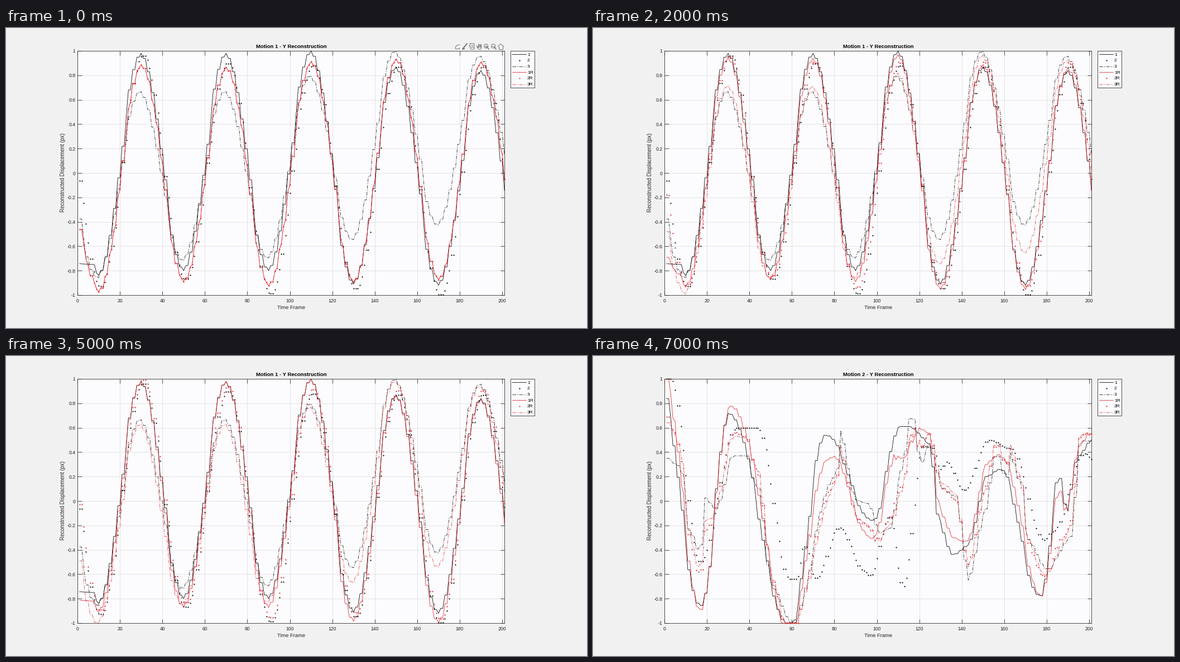
Recreate the animation shown at these times as a matplotlib script. Size 1041 by 538 pixels, loop 8000 ms.

```python
import numpy as np
import matplotlib.pyplot as plt
from matplotlib.animation import FuncAnimation
from matplotlib.patches import Circle, Rectangle

W, H, DPI = 1041, 538, 100
PX = 72 / DPI
INK, RED, PAPER, ICON = "#262626", "#e0222a", "#fcfcfe", "#6a6a6a"
LEFT, RIGHT, TOP, BOTTOM = 128, 893, 41, 479
X = np.arange(1, 202)

plt.rcParams["font.family"] = "Liberation Sans"


def held_times(lengths):
    """Evenly spaced moments, each repeated for a cycling number of samples."""
    counts = np.resize(lengths, len(X))
    moments = np.repeat(np.arange(len(X)), counts)[:len(X)] * np.mean(lengths)
    return moments + X.mean() - moments.mean()


COARSE = held_times((2, 1, 2, 2, 2, 1, 2, 2, 2, 2, 2))
FINE = held_times((2, 1, 1, 1))


def eased(times, keys):
    """Half-cosines through (time, percent) keys."""
    t, y = np.array(keys).T
    k = np.clip(np.searchsorted(t, times, "right") - 1, 0, len(t) - 2)
    u = np.clip((times - t[k]) / (t[k + 1] - t[k]), 0, 1)
    return (y[k] + (y[k + 1] - y[k]) * (1 - np.cos(np.pi * u)) / 2) / 100


def swing(times, shift, *extremes):
    """Troughs and peaks in turn, 20 samples apart."""
    return eased(times, [(20 * i - 10 + shift, y) for i, y in enumerate(extremes)])


# Motion 1: a regular swing; the first sensor rests before it starts
a = swing(COARSE, 0, 40, -84, 98, -80, 98, -80, 100, -91, 87, -92, 84, -85)
a = np.where(X < 9, -.742 - .001 * X, a)
b = swing(FINE, 1, 95, -93, 96, -87, 90, -99, 88, -95, 87, -100, 87, -84)
c = swing(COARSE, -.5, 41, -86, 67, -72, 67, -70, 80, -55, 100, -43, 96, -35)
regular = np.array([a, b, c])
regular_common = 1.07 * regular.mean(axis=0) - .04
regular_full = np.array([1.04 * a - .04, b + .035, 1.07 * c - .085])


def regular_fit(common):
    """Fit with the given share of the common mode in every sensor."""
    return regular_full + common * (regular_common - regular_full)


# Motion 2: an irregular drift
a = eased(COARSE, [(-2, 95), (17, -86), (30.5, 72), (59, -103), (76, 54), (98, -16),
                   (111, 61), (115, 61), (125, 47), (129, -15), (136, -44), (143, -36),
                   (152, 20), (158, 26), (177, -78), (186, 20), (189.5, -10),
                   (195, 37), (201, 50)])
b = eased(FINE, [(3, 100), (17, -50), (34, 60), (44, 60), (59, -64), (62, -64),
                 (66, -37), (71.5, -63), (82.5, -22), (94, -57), (97, -61), (106, -13),
                 (112.5, -70), (122, 45), (126, 44), (130, 26), (133, 32), (141, 9),
                 (153, 50), (163, 43), (179, -32), (183, -25), (198, 39), (202, 34)])
c = eased(COARSE, [(1, 35), (7, 29), (13, -27), (17, -44), (18.5, 3), (24, -7),
                   (33, 37), (39, 37), (42, 13), (44, 13), (50, -66), (60, -100),
                   (80.5, 20), (82.5, 58), (90, 1), (96, -2), (101, -26), (106, -23),
                   (112, 25), (116.5, 72), (120.5, 31), (124.5, 46), (131, 10),
                   (137, 4), (143, -65), (151, -10), (156.5, 39), (160.5, 18),
                   (162.5, 40), (168, 14), (171, -31), (180, -56), (192, -29),
                   (196, 49), (201, 49)])
irregular = np.array([a, b, c])
irregular_common = 1.2 * (.37 * a + .23 * b + .40 * c)


def irregular_fit(*gains):
    """Common mode plus a contrast mode with one gain per sensor."""
    return irregular_common + np.outer(gains, .4 * (a - c))


SCENES = [("Motion 1", regular, regular_fit(share)) for share in (1, .6, .35, .12, .06, 0)]
SCENES += [("Motion 2", irregular, irregular_fit(0, 0, 0)),
           ("Motion 2", irregular, irregular_fit(1, -.65, -.9))]

fig = plt.figure(figsize=(W / DPI, H / DPI), dpi=DPI, facecolor="#f1f1f1")
ax = fig.add_axes([LEFT / W, 1 - BOTTOM / H, (RIGHT - LEFT) / W, (BOTTOM - TOP) / H],
                  facecolor=PAPER)
ax.set(xlim=(0, 201), ylim=(-1, 1), xticks=range(0, 201, 20),
       yticks=np.linspace(-1, 1, 11))
ax.set_axisbelow(True)
ax.grid(color="#dddde0", lw=.8 * PX)
ax.tick_params(direction="in", length=7.5 * PX, width=.8 * PX, color=INK,
               top=True, right=True, labelbottom=False, labelleft=False)
for spine in ax.spines.values():
    spine.set(color=INK, linewidth=.8 * PX)

page = fig.add_axes([0, 0, 1, 1])
page.set(xlim=(0, W), ylim=(H, 0))
page.axis("off")


def label(x, y, text, size=8.6, color=INK, ha="center", **style):
    return page.text(x, y, text, fontsize=size * PX, color=color, ha=ha,
                     va=style.pop("va", "center_baseline"), **style)


for tick in range(0, 201, 20):
    label(LEFT + tick * (RIGHT - LEFT) / 201, 488.5, str(tick))
for i in range(11):
    label(124.5, TOP + i * (BOTTOM - TOP) / 10, f"{1 - i / 5:.1g}", ha="right")
label(511, 501, "Time Frame", 9.4)
label(102, 259.5, "Reconstructed Displacement (px)", 9.6, rotation=90, va="center")
title = label(511, 32.5, "", 9.5, "black", weight="bold")

STYLES = [dict(lw=.78 * PX), dict(ls="", marker="o", ms=2.2 * PX, mew=0),
          dict(lw=.7 * PX, ls=(0, (9, 3, 2.2, 3)))]
SERIES = [(name, color, style)
          for color, names in (("black", "1 2 3"), (RED, "1R 2R 3R"))
          for name, style in zip(names.split(), STYLES)]

page.add_patch(Rectangle((904, 41), 43, 66, fc=PAPER, ec=INK, lw=.8 * PX))
curves = []
for i, (name, color, style) in enumerate(SERIES):
    curves += ax.plot([], [], color=color, clip_on=False, zorder=3, **style)
    xs = [919.5] if "marker" in style else [907, 932]
    y = 47.2 + 10.7 * i
    page.plot(xs, [y] * len(xs), color=color, **style)
    label(934, y, name, 8.4, "black", ha="left")

# Axes toolbar: export, brush, data tip, pan, zoom in, zoom out, home
toolbar = []


def stroke(xs, ys, width=.9):
    toolbar.extend(page.plot(xs, ys, color=ICON, lw=width * PX))


stroke([805, 805, 812, 812], [33, 37, 37, 35])
stroke([806, 808, 813], [34, 31, 30])
stroke([826, 821], [28, 34], 1.6)
stroke([821, 818, 821], [34, 38, 37], 1.8)
stroke([831, 831, 839, 839, 833, 831], [33, 28, 28, 38, 38, 33])
for y in (31, 34):
    stroke([833, 837], [y, y])
stroke([846, 843, 847, 851, 852], [35, 32, 38, 38, 30])
for x in (846, 848, 850):
    stroke([x, x], [34, 28.5], 1.2)
for x in (860, 873):
    toolbar.append(page.add_patch(Circle((x, 32.5), 3.6, fill=False, ec=ICON, lw=.9 * PX)))
    stroke([x + 2.6, x + 5], [35, 38], 1.4)
    stroke([x - 2, x + 2], [32.5, 32.5])
stroke([860, 860], [30.5, 34.5])
stroke([881.5, 886.5, 891.5], [33, 28.5, 33])
stroke([883, 883, 890, 890], [33, 38, 38, 33])


def draw(frame):
    name, measured, fitted = SCENES[frame]
    title.set_text(f"{name} - Y Reconstruction")
    for curve, y in zip(curves, [*measured, *fitted]):
        curve.set_data(X, np.clip(y, -1, 1))
    # Equal fits show the dots on top of a single line
    for part in toolbar:
        part.set_visible(frame == 0)
    return [title, *curves, *toolbar]


animation = FuncAnimation(fig, draw, frames=len(SCENES), interval=1000,
                          repeat=True, repeat_delay=0)
plt.show()
```
